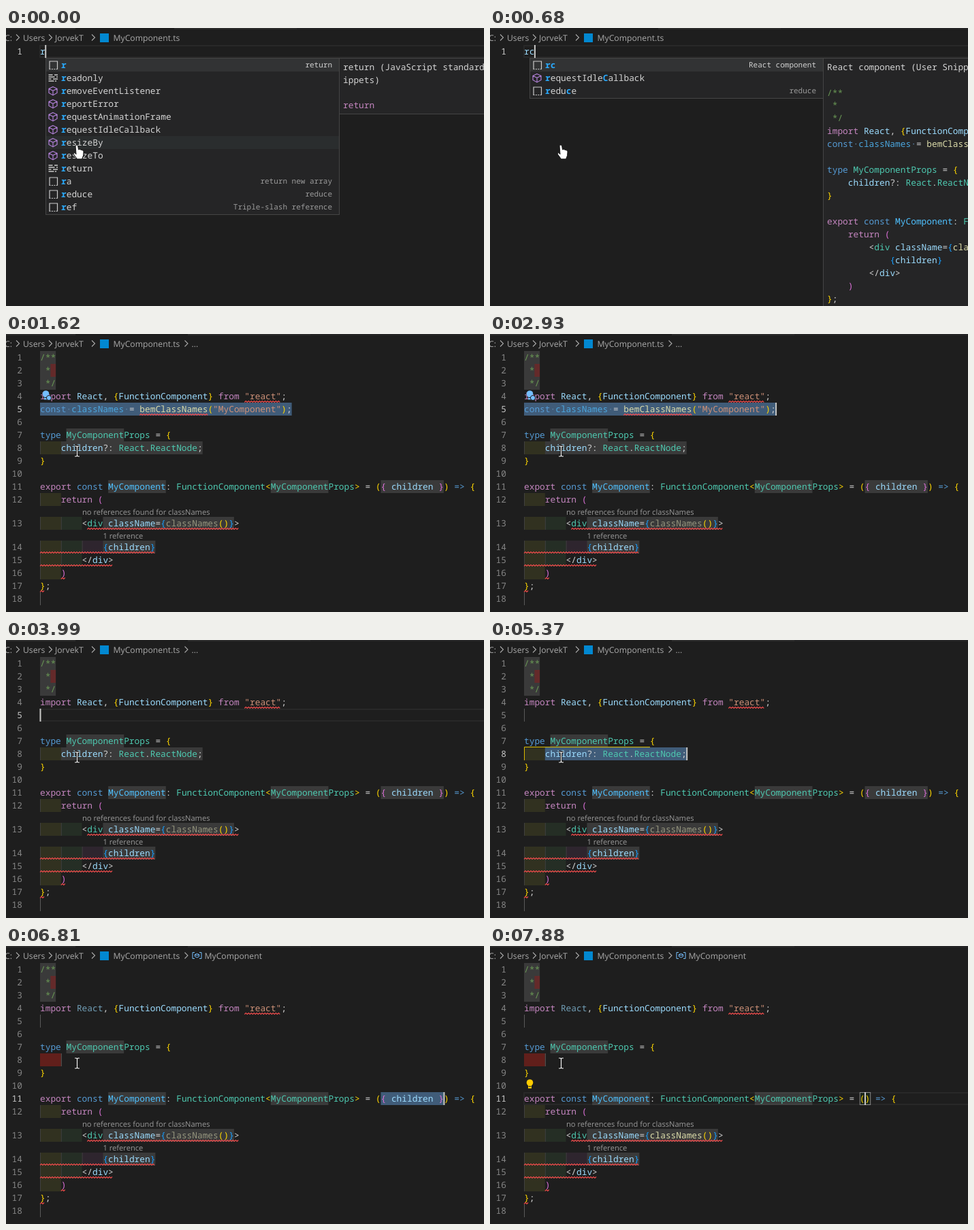
Recreate the animation shown at these times as an HTML page. Size 702 px wide and 409 px high, loop 8000 ms.

```html
<!DOCTYPE html>
<html lang="en">
<head>
<meta charset="utf-8">
<title>Editor snippet</title>
<style>
html, body { margin: 0; width: 100%; height: 100%; overflow: hidden; background: #1e1e1e; }
svg { display: block; width: 702px; height: 409px; }
text { white-space: pre; text-rendering: geometricPrecision; }
.mono { font: 12.83px "Noto Sans Mono", "DejaVu Sans Mono", monospace; }
.detail { font: 11px "Noto Sans Mono", "DejaVu Sans Mono", monospace; }
.ui { font: 12.2px "Open Sans", "Noto Sans", sans-serif; }
.lens { font: 11.15px "Open Sans", "Noto Sans", sans-serif; }
</style>
</head>
<body>
<svg id="stage" viewBox="0 0 702 409"></svg>
<script>
const LOOP = 8000, LEFT = 50, CHAR = 7.7, ROW = 19;
const CUTS = [0, 680, 1250, 1390, 1470, 1540, 1620, 2020, 2440, 2930, 3500, 3750, 3910, 4150, 4640,
  5130, 5370, 5610, 5940, 6200, 6430, 6500, 6670, 6970, 7220, 7710, 7880];

const COLORS = {
  d: '#d4d4d4', p: '#c586c0', b: '#569cd6', v: '#9cdcfe', c: '#4fc1ff', t: '#4ec9b0', s: '#ce9178',
  f: '#dcdcaa', g: '#6a9955', y: '#ffd700', o: '#da70d6', u: '#179fff',
  w: '#72a0b8', q: '#96967f', n: '#4ba6de', m: '#5d85a8'
};

const stage = document.getElementById('stage');
const esc = s => s.replace(/&/g, '&amp;').replace(/</g, '&lt;').replace(/>/g, '&gt;');
const colX = col => LEFT + col * CHAR;
const lineY = n => n < 13 ? 25 + ROW * (n - 1) : n === 13 ? 269 : 304 + ROW * (n - 14);

const rect = (x, y, w, h, fill, extra = '') =>
  `<rect x="${x}" y="${y}" width="${w}" height="${h}" fill="${fill}" ${extra}/>`;
const path = (d, stroke, extra = '') => `<path d="${d}" fill="none" stroke="${stroke}" ${extra}/>`;
const text = (cls, x, y, s, fill, extra = '') =>
  `<text class="${cls}" x="${x}" y="${y}" fill="${fill}" ${extra}>${esc(s)}</text>`;

const block = (line, from, to, fill) =>
  rect(colX(from), lineY(line), (to - from) * CHAR, ROW, fill);
const holder = (line, from, to) => block(line, from, to, 'rgba(124,124,124,.3)');
const selection = (line, from, to) => block(line, from, to, '#264f78');
const emptyStop = line => rect(LEFT, lineY(line), 1, ROW, '#5a5a5a');

// Tokens are split by "|"; the first letter of each picks its colour.
function code(src, x, top) {
  let col = 0, out = '';
  for (const tok of src.split('|')) {
    const body = tok.slice(1);
    out += `<tspan x="${x + col * CHAR}" fill="${COLORS[tok[0]]}">${esc(body)}</tspan>`;
    col += body.length;
  }
  return `<text class="mono" y="${top + 13.5}">${out}</text>`;
}

function squiggle(line, from, to) {
  const y = lineY(line) + 17.5, end = colX(to);
  let d = '', up = 1;
  for (let x = colX(from); x <= end; x += 2, up = -up) d += `${d ? 'L' : 'M'}${x} ${y + up}`;
  return path(d, '#f14c4c', 'stroke-width="1.1"');
}

const bracket = (line, col) => rect(colX(col) + .5, lineY(line) + .5, CHAR, 18,
  'rgba(0,100,0,.1)', 'stroke="#888"');

const activeLine = line => rect(LEFT, lineY(line) + 1, 660, 17, 'none', 'stroke="#282828" stroke-width="2"');

function bulb(y, fixable) {
  const color = fixable ? '#75beff' : '#ffcc00';
  return `<circle cx="58.5" cy="${y - 2}" r="4.8" fill="${color}"/>` +
    rect(56, y + 1, 5, 5.5, color) + rect(56.5, y + 3, 4, 1, '#1e1e1e') +
    (fixable ? `<circle cx="63" cy="${y + 4}" r="3.6" fill="${color}" stroke="#1e1e1e"/>` : '');
}

function codeLines(s) {
  return [
    'g/**', 'g *', 'g */',
    `pimport |${s.reactUsed ? 'v' : 'w'}React|d, |y{|vFunctionComponent|y}|p from |s"react"|d;`,
    s.constGone ? 'd' : 'bconst|m' + '·|nclassNames|m·|d= |fbemClassNames|y(|s"MyComponent"|y)|d;',
    'd',
    'btype |tMyComponentProps|d = |y{',
    s.propGone ? 'd' : 'd    |vchildren|d?: |tReact|d.|tReactNode|d;',
    'y}',
    'd',
    'pexport |bconst |cMyComponent|d: |tFunctionComponent|y<|tMyComponentProps|y>|d = |y(' +
      (s.argGone ? '' : '|o{|v children |o}') + '|y)|b => |y{',
    'd    |preturn |o(',
    `d        <|tdiv|v className|d=|u{|${s.dim ? 'q' : 'f'}classNames|y()|u}|d>`,
    'd            |u{|vchildren|u}',
    'd        </|vdiv|d>',
    'd    |o)',
    'y}|d;',
    'd'
  ];
}

function tabs(edge) {
  return rect(0, 0, 702, 2, '#252526') + rect(0, 0, 102, 2, '#2d2d2d') +
    rect(102, 0, edge - 282, 2, '#1e1e1e') + rect(edge - 180, 0, 180, 2, '#2d2d2d');
}

function breadcrumb(tail) {
  const grey = '#a9a9a9', word = (x, s) => text('ui', x, 18.6, s, grey);
  const chevron = x => path(`M${x} 9.5l4.5 4.5-4.5 4.5`, grey, 'stroke-width="1.1"');
  let out = word(-2, 'C:') + chevron(15) + word(25, 'Users') + chevron(63) + word(72, 'JorvekT') +
    chevron(126) + rect(138, 8, 13, 13, '#0288d1') + word(157.5, 'MyComponent.ts');
  if (!tail) return out;
  out += chevron(262.5);
  if (tail === '...') return out + word(272.5, '...');
  return out + path('M277 9.5h-3v9h3M284 9.5h3v9h-3M277.5 12.5l3-1.2 3 1.2v3l-3 1.4-3-1.4zl3 1.4 3-1.4', '#75beff') +
    word(291.5, tail);
}

const ICONS = {
  snippet: y => path(`M64 ${y + 6}v-11.5h11.5v11.5`, '#ccc', 'stroke-width="1.2"') +
    path(`M63.5 ${y + 6}h13`, '#ccc', 'stroke-width="1.2" stroke-dasharray="2 1.4"'),
  keyword: y => path(`M62.5 ${y - 4.5}h6M71 ${y - 4.5}h5M62.5 ${y - 1.5}h9M74 ${y - 1.5}h2` +
    `M62.5 ${y + 1.5}h4M69 ${y + 1.5}h7M62.5 ${y + 4.5}h8M72 ${y + 4.5}h2`, '#ccc', 'stroke-width="1.3"'),
  method: y => path(`M69 ${y - 6}l6 2.8v6.2l-6 3.4-6-3.4v-6.2zM63 ${y - 3.2}l6 3 6-3M69 ${y - .2}v6.4`,
    '#b180d7', 'stroke-width="1.2"')
};

function suggestRow(i, typed, [icon, label, detail], state) {
  const top = 45 + ROW * i;
  let left = typed, chars = '';
  for (const ch of label) {
    const hit = left && ch.toLowerCase() === left[0];
    if (hit) left = left.slice(1);
    chars += hit ? `<tspan fill="#2aaaff" font-weight="bold">${ch}</tspan>` : ch;
  }
  const back = { selected: '#323334', hover: '#2a2d2e' }[state];
  return (back ? rect(59, top, 430, ROW, back) : '') + ICONS[icon](top + 9.5) +
    `<text class="mono" x="81" y="${top + 13.5}" fill="#d4d4d4">${chars}</text>` +
    (detail ? text('detail', 479, top + 12.8, detail, state ? '#d0d0d0' : '#9a9a9a', 'text-anchor="end"') : '');
}

function popup(typed) {
  const first = typed === 'r';
  const items = first ? [
    ['snippet', 'r', 'return'], ['keyword', 'readonly'], ['method', 'removeEventListener'],
    ['method', 'reportError'], ['method', 'requestAnimationFrame'], ['method', 'requestIdleCallback'],
    ['method', 'resizeBy'], ['method', 'resizeTo'], ['keyword', 'return'],
    ['snippet', 'ra', 'return new array'], ['snippet', 'reduce', 'reduce'],
    ['snippet', 'ref', 'Triple-slash reference']
  ] : [
    ['snippet', 'rc', 'React component'], ['method', 'requestIdleCallback'], ['snippet', 'reduce', 'reduce']
  ];
  const docs = first
    ? ['dreturn (JavaScript standard sn', 'dippets)', 'd', 'preturn']
    : ['dReact component (User Snippet)', 'd', ...codeLines({ reactUsed: true })];
  const frame = 'stroke="#454545"';
  return rect(489.5, 44.5, 260, first ? 82 : 400, '#252526', frame) +
    docs.map((s, i) => code(s, 495, 48 + ROW * i - (i > 2 ? 1 : 0))).join('') +
    rect(58.5, 44.5, 431, items.length * ROW + 2, '#252526', frame) +
    items.map((it, i) => suggestRow(i, typed, it, i === 0 ? 'selected' : i === 6 ? 'hover' : '')).join('');
}

function indents() {
  const tint = ['rgba(255,255,64,.085)', 'rgba(127,255,127,.07)', 'rgba(255,127,255,.07)'];
  const depth = { 12: 1, 13: 2, 14: 3, 15: 2, 16: 1 };
  let out = '';
  for (const n in depth)
    for (let i = 0; i < depth[n]; i++)
      out += block(+n, i * 4, i * 4 + 4, tint[i]) + rect(colX(i * 4), lineY(+n), 1, ROW, '#404040');
  return out;
}

function caretAt(t) {
  const off = [[1620, 2020], [2440, 2930], [4150, 4640], [5130, 5370], [5940, 6200], [7220, 7710]];
  if (off.some(([a, b]) => t >= a && t < b)) return '';
  const [, line, col] = [[0, 1, 1], [680, 1, 2], [1250, 5, 48], [3500, 5, 0], [5370, 8, 31],
    [6200, 8, 4], [6670, 11, 77], [7710, 11, 65]].filter(k => t >= k[0]).pop();
  return rect(colX(col) - .5, lineY(line), 2, ROW, '#c8c8c6');
}

const hand = '<path d="M102 173q2-2 3.5 0l1 6 2-.5 2 1 2 .3 1.5 2-.5 6-2 5h-7l-5-7q-1-3 1.5-2l2 2z" ' +
  'fill="#fff" stroke="#111" stroke-width=".9"/>';
const beamShape = 'M101 165h2.5l1 1 1-1h2.5M104.5 166v13M101 180h2.5l1-1 1 1h2.5';
const beam = path(beamShape, '#111', 'stroke-width="3"') + path(beamShape, '#fff', 'stroke-width="1.2"');

function editor(t) {
  const since = x => t >= x, span = (a, b) => t >= a && t < b;
  const s = {
    constGone: since(3500), propGone: since(6200), argGone: since(7710), reactUsed: !since(6430),
    dim: since(1620) && !span(3750, 3910) && !span(6430, 6500) && !since(7880)
  };
  const current = since(6670) ? 11 : since(5370) ? 8 : 5;
  const red = 'rgba(128,32,26,.68)';
  let out = indents();

  if (span(3500, 5370) || span(6200, 6670) || since(7710)) out += activeLine(current);

  out += holder(1, 0, 3) + holder(2, 0, 3) + holder(3, 0, 3) + block(2, 2, 3, 'rgba(128,32,32,.6)');
  if (s.constGone) out += emptyStop(5);
  else out += selection(5, 0, 48) + holder(5, 0, 48);
  out += holder(7, 5, 16);
  if (s.propGone) out += block(8, 0, 4, red) + rect(colX(4), lineY(8), 1, ROW, '#5a5a5a');
  else {
    out += block(8, 0, 4, 'rgba(255,255,64,.085)') + rect(LEFT, lineY(8), 1, ROW, '#404040');
    if (since(5370)) out += selection(8, 4, 31);
    out += holder(8, 4, 31);
  }
  out += holder(11, 13, 24) + holder(11, 44, 55);
  if (!s.argGone) out += (since(6670) ? selection(11, 65, 77) : '') + holder(11, 65, 77);
  out += holder(13, 12, 37) + holder(14, 12, 22) + emptyStop(18);

  if (span(5370, 6670)) out += path('M50.5 177V157.5H235', '#d9b900');
  if (span(6200, 6670)) out += bracket(7, 24) + bracket(9, 0);
  if (s.argGone) out += bracket(11, 64) + bracket(11, 65);

  codeLines(s).forEach((src, i) => {
    const n = i + 1, y = lineY(n);
    out += text('mono', 24, y + 13.5, String(n), n === current ? '#c6c6c6' : '#858585', 'text-anchor="end"') +
      code(src, LEFT, y);
  });

  if (!since(1390)) out += squiggle(1, 0, 3);
  if (since(1470))
    out += text('lens', 112, 265.8, 'no references found for classNames', '#999') +
      text('lens', 142.5, 300.8, '1 reference', '#999');
  if (since(1540)) {
    out += squiggle(4, 39, 46) + squiggle(13, 9, 38) + squiggle(14, 0, 22) + squiggle(15, 0, 14) +
      squiggle(16, 4, 5) + squiggle(17, 0, 1);
    if (!s.constGone) out += squiggle(5, 19, 32);
  }

  if (!since(3750)) out += bulb(90, since(1540));
  if (span(5610, 6670)) out += bulb(166);
  if (since(6970)) out += bulb(203);

  const tail = since(6670) ? 'MyComponent' : since(5610) ? 'MyComponentProps' : since(1390) ? '...' : '';
  return out + tabs(since(1390) ? 447 : 437) + breadcrumb(tail) + caretAt(t) + beam;
}

function typing(t) {
  const typed = t < 680 ? 'r' : 'rc';
  return activeLine(1) + text('mono', 24, 38.5, '1', '#c6c6c6', 'text-anchor="end"') +
    code('v' + typed, LEFT, 25) + tabs(427) + breadcrumb('') + caretAt(t) + popup(typed) + hand;
}

let shown = -1;
function tick(now) {
  const t = now % LOOP;
  const cut = CUTS.filter(c => c <= t).pop();
  if (cut !== shown) {
    shown = cut;
    stage.innerHTML = rect(0, 0, 702, 409, '#1e1e1e') + (cut < 1250 ? typing(cut) : editor(cut));
  }
}

const start = performance.now();
function loop() {
  tick(performance.now() - start);
  requestAnimationFrame(loop);
}
loop();
</script>
</body>
</html>
```
